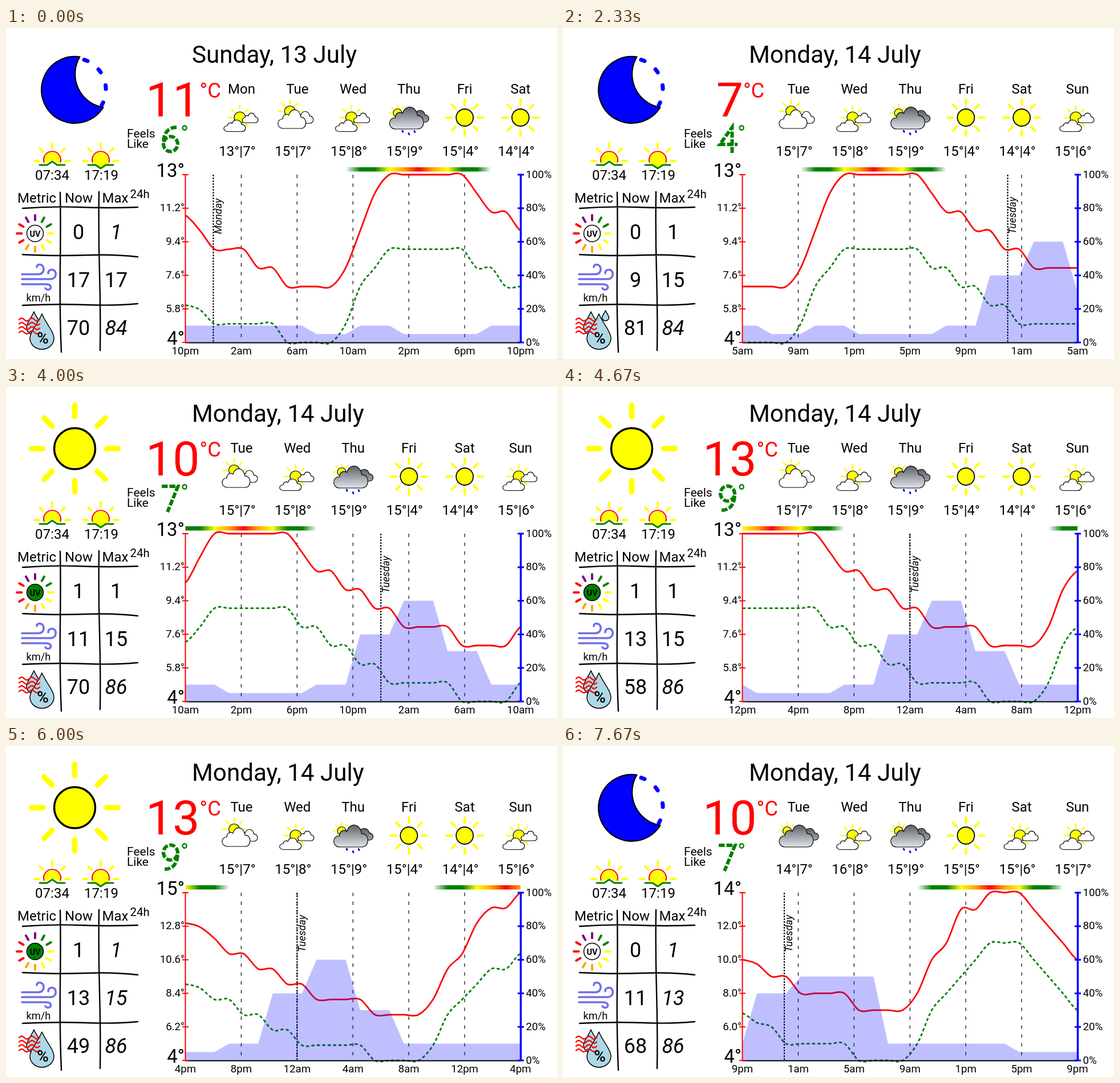
An HTML page for the animation above (8 s loop, 966 by 580 pixels).

```html
<!DOCTYPE html>
<html lang="en">
<head>
<meta charset="utf-8">
<title>Weather dashboard</title>
<style>
html, body { margin: 0; width: 100%; height: 100%; overflow: hidden; background: #fff; }
svg { display: block; width: 966px; height: 580px; font-family: Roboto, Arial, sans-serif; }
.m { text-anchor: middle; }
.e { text-anchor: end; }
.ln { fill: none; stroke-linecap: round; stroke-linejoin: round; }
.cloud path { stroke: #000; stroke-width: 1.2; vector-effect: non-scaling-stroke; }
</style>
</head>
<body>
<svg id="stage" viewBox="0 0 966 580"></svg>
<script>
const L = 314.5, R = 902, T = 257, B = 551;
const days = ['Sunday', 'Monday', 'Tuesday'];
const rep = pairs => pairs.flatMap(([v, n]) => Array(n).fill(v));

// hourly series, starting Sunday 10pm
const temp = [11, 10, 9, 9, 9, 8, 8, 7, 7, 7, 7, 8, 10, 12, 13, 13, 13, 13, 13, 13, 12, 11, 11,
  10, 10, 9, 9, 8, 8, 8, 8, 7, 7, 7, 7, 8, 10, 11, 13, 14, 14, 15, 14, 13, 12];
const feel = [6, 6, 5, 5, 5, 5, 5, 4, 4, 4, 4, 5, 7, 8, 9, 9, 9, 9, 9, 9, 8, 8, 7,
  7, 6, 6, 5, 5, 5, 5, 5, 4, 4, 4, 4, 5, 7, 8, 9, 10, 10, 11, 11, 10, 9];
const rain = rep([[10, 9], [5, 3], [10, 3], [5, 6], [10, 3], [40, 3], [60, 3], [30, 3], [10, 9], [5, 3]]);
const early = { temp, feel, rain };
const late = {
  temp: [...temp.slice(0, 39), 13, 14, 14, 14, 13, 12, 11, 10],
  feel: [...feel.slice(0, 39), 10, 11, 11, 11, 10, 9, 8, 7],
  rain: [...rain.slice(0, 27), ...rep([[50, 6], [10, 9], [5, 5]])]
};
const wind = [17, 16, 15, 14, 13, 12, 10, 9, 9, 9, 9, 10, 11, 12, 13, 13, 13, 13, 13, 12, 11, 12, 12, 11];
const humid = [70, 72, 74, 76, 78, 79, 80, 81, 82, 84, 82, 76, 70, 64, 58, 53, 50, 49, 49, 52, 57, 62, 65, 68];
const uvDay = ['green', 'green', 'yellow', 'orange', 'red', 'orange', 'yellow', 'green', 'green'];
const uvAt = g => uvDay[(g + 22) % 24 - 10];

const outlook = [
  [['Mon', 'pair', 13, 7], ['Tue', 'cloudy', 15, 7], ['Wed', 'pair', 15, 8], ['Thu', 'rain', 15, 9], ['Fri', 'sun', 15, 4], ['Sat', 'sun', 14, 4]],
  [['Tue', 'cloudy', 15, 7], ['Wed', 'pair', 15, 8], ['Thu', 'rain', 15, 9], ['Fri', 'sun', 15, 4], ['Sat', 'sun', 14, 4], ['Sun', 'pair', 15, 6]],
  [['Tue', 'grey', 14, 7], ['Wed', 'pair', 16, 8], ['Thu', 'rain', 15, 9], ['Fri', 'sun', 15, 5], ['Sat', 'pair', 15, 6], ['Sun', 'pair', 15, 7]]
];

// stencil digits, drawn as dashed centre lines
const six = 'M299 174C284 174 276 185 276 201V203A12.5 13.5 0 1 0 301 203A12.5 13.5 0 0 0 276.5 200';
const stencil = {
  4: 'M296.5 219V174L275 204H306',
  5: 'M301 174H280.5L278.5 195Q283 191 289 191A12 12.5 0 0 1 289 216Q278 216 276 206',
  6: six,
  7: 'M273 174H301.5L283 219',
  8: 'M289 195A10.5 10.5 0 1 1 289.1 195A12 10.8 0 1 1 288.9 195',
  9: six
};

const text = (x, y, size, s, attr = '') => `<text x="${x}" y="${y}" font-size="${size}" ${attr}>${s}</text>`;
const mid = (x, y, size, s, attr = '') => text(x, y, size, s, 'class="m" ' + attr);
const line = (x1, y1, x2, y2, c, w, attr = '') =>
  `<line x1="${x1}" y1="${y1}" x2="${x2}" y2="${y2}" stroke="${c}" stroke-width="${w}" ${attr}/>`;
const path = (d, c, w, attr = '') => `<path class="ln" d="${d}" stroke="${c}" stroke-width="${w}" ${attr}/>`;

function rays(x, y, r1, r2, w, n, color, from = 0, to = n) {
  let s = '';
  for (let i = from; i < to; i++) {
    const a = i * 2 * Math.PI / n, c = Math.cos(a), d = Math.sin(a);
    s += line(x + r1 * c, y + r1 * d, x + r2 * c, y + r2 * d, color(i), w, 'stroke-linecap="round"');
  }
  return s;
}
const yellow = () => '#ff0';
const sun = (x, y, r, r1, r2, w, sw) => rays(x, y, r1, r2, w, 8, yellow) +
  `<circle cx="${x}" cy="${y}" r="${r}" fill="#ff0" stroke="#000" stroke-width="${sw}"/>`;
const cloud = (x, y, w, h, fill) => `<g class="cloud" transform="translate(${x} ${y}) scale(${w / 60} ${h / 40})">
  <path fill="${fill}" d="M11 40C-3 40-4 20 10 20C10 11 18 8 23 12C27-4 46-4 49 16C63 15 64 40 49 40Z"/></g>`;

const icons = {
  sun: x => sun(x, 157, 15, 22.5, 32, 4, 1.8),
  pair: x => sun(x - 3, 157, 10, 14, 20.5, 2.6, 1.2) +
    cloud(x + 1, 149, 28, 17, '#fff') + cloud(x - 31, 161, 38, 20.5, '#fff'),
  cloudy: x => sun(x - 13, 146, 9.5, 13.5, 20, 2.6, 1.2) +
    cloud(x - 7, 146, 35, 21, '#fff') + cloud(x - 34, 143, 49, 33, '#fff'),
  grey: x => sun(x - 20, 149, 7.5, 10.5, 15, 2.2, 1.2) +
    cloud(x - 3, 144, 38, 21, 'url(#dark)') + cloud(x - 34, 138, 60, 39, 'url(#grey)'),
  rain: x => icons.grey(x) + [[-11, 180], [0, 184.5], [10, 180.5]].map(([dx, y]) =>
    line(x + dx - .5, y, x + dx + .5, y + 2, '#00f', 2.8, 'stroke-linecap="round"')).join('')
};

const moon = () => path('M129.5 50.5A58.5 58.5 0 1 0 170.5 139A59 59 0 0 1 129.5 50.5Z', '#000', 2.2, 'style="fill:#00f"') +
  path('M137 55.6A55 55 0 0 1 168 135', '#00f', 7, 'stroke-dasharray="6.5 24.2"');

function horizon(x, dir) {
  return rays(x, 233, 23, 31, 3.8, 8, yellow, 4, 9) +
    `<path d="M${x - 15} 238V233a15 15 0 0 1 30 0V238L${x} ${238 + 6 * dir}Z" fill="#ff0"/>` +
    path(`M${x - 14.5} 235a15 15 0 1 1 29 0`, 'red', 2) +
    path(`M${x - 22} 240h13l9 ${6 * dir}l9 ${-6 * dir}h13`, 'green', 3);
}

function uvIcon(on) {
  const hues = ['yellow', 'yellow', 'yellow', 'orange', 'orange', 'red', 'red', 'red', 'purple', 'purple', 'green', 'green'];
  return rays(51, 360, 23.5, 32, 4, 12, i => hues[i]) +
    `<circle cx="51" cy="360" r="14.5" fill="${on ? 'green' : '#fff'}" stroke="#000" stroke-width="1.5"/>` +
    mid(51, 365.5, 14.5, 'UV', 'font-weight="700"');
}
const windIcon = () => path('M28 431.5H57C69 431.5 69 414 58 414.5Q54 415 54 419M28 440H78C90 440 90 423 80 423.5Q74 424 74 430M28 449H70C81 449 81 459 73 458.5Q70 458 69 456', '#6f6fe8', 3.6);

const drop = (x, y, w, h) => `<path d="M${x} ${y}C${x + w * .15} ${y + h * .25} ${x + w * .5} ${y + h * .5} ${x + w * .5} ${y + h * .69}
  A${w / 2} ${h * .31} 0 0 1 ${x - w / 2} ${y + h * .69}C${x - w / 2} ${y + h * .5} ${x - w * .15} ${y + h * .25} ${x} ${y}Z"
  fill="lightblue" stroke="#000" stroke-width="1.5" stroke-linejoin="round"/>`;
function humidIcon(h) {
  let s = drop(49, 497, 26, 40) + drop(63, 501, 42, 62);
  if (h > 70) s += drop(74.5, 495, 12, 18);
  for (let y = 511; y < 535; y += 7.5)
    s += path(`M23 ${y}q4.5 -5 9 0t9 0t9 0t9 0`, 'red', 2.4);
  return s + mid(64.5, 553, 28, '%', 'font-weight="500"');
}

function table(k) {
  const row = (y, now, max, ital) => mid(127, y, 36, now) +
    mid(193, y, 36, max, ital ? 'font-style="italic"' : '');
  const windMax = k < 2 ? 17 - k : k < 22 ? 15 : 13;
  const uv = uvAt(k);
  return text(20, 306, 24, 'Metric') + mid(127.5, 306, 24, 'Now') + text(168.5, 306, 24, 'Max') + text(217.5, 297.5, 20.5, '24h') +
    path('M95 288Q96 340 95 420T97 568M163 287Q162 360 164 430T165 565M29 316Q80 312 130 314T231 314M29 397Q90 400 140 398T231 401M29 486Q90 483 140 485T231 483', '#000', 2.4) +
    uvIcon(uv) + windIcon() + text(35.5, 479, 18.3, 'km/h') + humidIcon(humid[k]) +
    row(370, uv ? 1 : 0, 1, k < 2 || k > 15) +
    row(454, wind[k], windMax, k > 15) +
    row(538, humid[k], k < 9 ? 84 : 86, k < 2 || k > 6);
}

const clock = h => `${h % 12 || 12}${h % 24 < 12 ? 'am' : 'pm'}`;

function chart(k) {
  const src = k < 22 ? early : late;
  const cut = name => src[name].slice(k, k + 24);
  const hot = Math.max(...cut('temp')), cold = 4, small = 18.67;
  const px = i => L + i * (R - L) / 23;
  const py = v => B - (v - cold) * (B - T) / (hot - cold);
  const tick = i => L + i * (R - L) / 6;

  // the first two points are eased toward their neighbours
  function curve(v) {
    const a = v.slice();
    a[0] = .82 * v[0] + .18 * v[1];
    a[1] = (v[0] + 2 * v[1] + v[2]) / 4;
    const at = i => a[Math.max(0, Math.min(23, i))], dx = px(1) - px(0);
    let d = `M${L} ${py(a[0])}`;
    for (let i = 0; i < 23; i++)
      d += `C${px(i) + dx / 3} ${py(at(i) + (at(i + 1) - at(i - 1)) / 6)} ${px(i + 1) - dx / 3} ${py(at(i + 1) - (at(i + 2) - at(i)) / 6)} ${px(i + 1)} ${py(at(i + 1))}`;
    return d;
  }

  const stops = cut('temp').map((_, i) => {
    const c = uvAt(k + i);
    return `<stop offset="${i / 23}" stop-color="${c || 'green'}" stop-opacity="${c ? 1 : 0}"/>`;
  }).join('');
  let s = `<linearGradient id="uv" gradientUnits="userSpaceOnUse" x1="${L}" x2="${R}" y1="0" y2="0">${stops}</linearGradient>
    <rect x="${L}" y="244" width="${R - L}" height="7.5" fill="url(#uv)"/>`;

  for (let i = 1; i < 6; i++)
    s += line(tick(i), T, tick(i), B, '#000', 1.2, 'stroke-dasharray="6 9.5"');
  const gap = (26 - k) % 24;
  if (gap) {
    const x = tick(gap / 4);
    s += line(x, T, x, B, '#000', 2, 'stroke-dasharray="3 2"') +
      `<text transform="translate(${x + 14.5} 361) rotate(-90)" font-size="18" font-style="italic">${days[k < 2 ? 1 : 2]}</text>`;
  }
  s += `<path d="${curve(cut('temp'))}" fill="none" stroke="red" stroke-width="2.8"/>
    <path d="${curve(cut('feel'))}" fill="none" stroke="green" stroke-width="2.8" stroke-dasharray="5.5 4"/>
    <polygon points="${L},${B} ${cut('rain').map((v, i) => px(i) + ',' + (B - v * (B - T) / 100)).join(' ')} ${R},${B}" fill="#00f" opacity=".25"/>`;

  s += line(L, B + .5, R, B + .5, '#000', 2) + line(L, T - 1, L, B + 1, 'red', 2) + line(R + .5, T - 1, R + .5, B + 1, '#00f', 3.5);
  for (let i = 0; i < 6; i++) {
    const y = T + i * (B - T) / 5, big = i % 5 === 0, v = hot - i * (hot - cold) / 5;
    s += line(309, y, 320, y, 'red', 2) + line(897, y, 908, y, '#00f', 3) +
      text(911.5, y + 5.5, small, `${100 - 20 * i}%`) +
      text(313, y + (big ? 3.5 : 5.5), big ? 33 : small, (big ? v : v.toFixed(1)) + '°', 'class="e"');
  }
  for (let i = 0; i < 7; i++) s += mid(tick(i), 571.5, small, clock(k + 22 + 4 * i));
  return s;
}

function draw(k) {
  const cast = outlook[k < 2 ? 0 : k < 22 ? 1 : 2];
  const lit = k > 9 && k < 20;
  return `<defs>
    <linearGradient id="grey" x2="0" y2="1"><stop stop-color="#5c5f66"/><stop offset="1" stop-color="#e0e3e8"/></linearGradient>
    <linearGradient id="dark" x2="0" y2="1"><stop stop-color="#5c5f66"/><stop offset="1" stop-color="#a4a6ac"/></linearGradient>
    </defs>` +
    text(326, 61, 42.2, k < 2 ? 'Sunday, 13 July' : 'Monday, 14 July') +
    (lit ? sun(120.5, 108, 36, 56, 76, 9.5, 3.5) : moon()) +
    horizon(81, -1) + horizon(166, 1) + mid(81, 266, 24, '07:34') + mid(167, 266, 24, '17:19') +
    mid(311, 155, 84, `${temp[k]}<tspan font-size="36.5" dy="-33.5">°C</tspan>`, 'fill="red"') +
    text(212, 191.5, 21, 'Feels') + text(212, 210, 21, 'Like') +
    `<path d="${stencil[feel[k]]}" fill="none" stroke="green" stroke-width="6" stroke-dasharray="10.5 3"
      ${feel[k] === 9 ? 'transform="rotate(180 288.5 195)"' : ''}/>` +
    text(306, 198, 38, '°', 'fill="green"') +
    cast.map(([day, kind, hi, lo], i) => {
      const x = 413 + 97.8 * i;
      return mid(x, 115, 24, day) + icons[kind](x) + mid(x - 7.5, 223.5, 24, `${hi}°|${lo}°`);
    }).join('') + table(k) + chart(k);
}

const stage = document.getElementById('stage');
const start = performance.now();
let shown = -1;
function tick() {
  const t = (performance.now() - start) % 8000, r = t % 1000;
  const k = 3 * Math.floor(t / 1000) + (r >= 670 ? 2 : r >= 330 ? 1 : 0);
  if (k !== shown) stage.innerHTML = draw(shown = k);
  requestAnimationFrame(tick);
}
tick();
</script>
</body>
</html>
```
